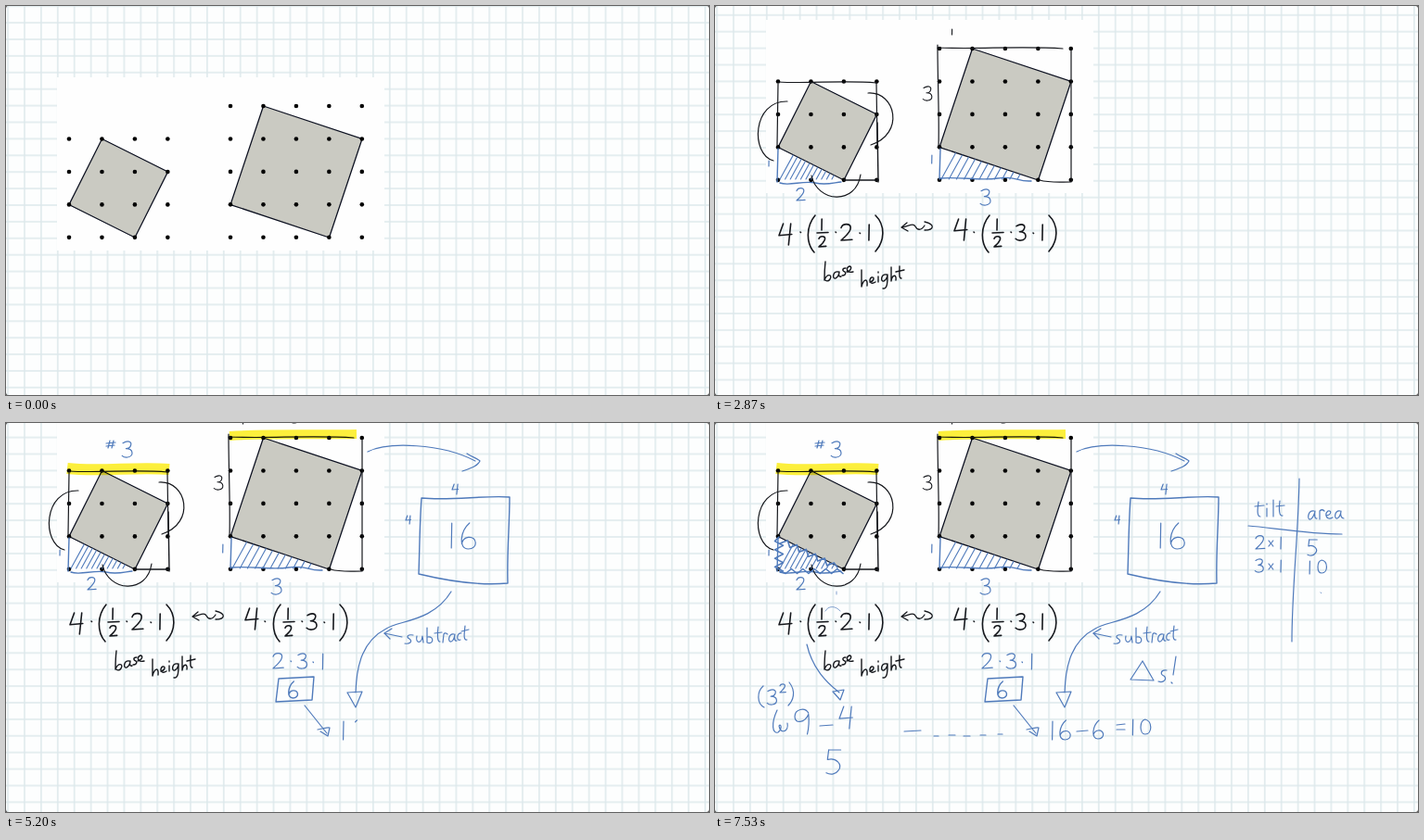
An HTML page that plays this animation: 758x420 px, repeating every 7.59 s.

```html
<!DOCTYPE html>
<html lang="en">
<head>
<meta charset="utf-8">
<title>Tilted squares</title>
<style>
html, body { margin: 0; width: 100%; height: 100%; overflow: hidden; background: #555; }
svg { display: block; width: 758px; height: 420px; border-radius: 3px; background: #fdfefe; }
#ink path { fill: none; stroke-linecap: round; stroke-linejoin: round; }
#ink .marker { stroke-linecap: butt; mix-blend-mode: multiply; }
</style>
</head>
<body>
<svg viewBox="0 0 758 420">
  <defs>
    <pattern id="grid" x="1.2" y="-3.3" width="17.9" height="17.9" patternUnits="userSpaceOnUse">
      <path d="M.9 0V17.9M0 .9H17.9" stroke="#dde9ec" stroke-width="1.5"/>
    </pattern>
  </defs>
  <g id="page">
    <rect y="-100" width="758" height="640" fill="url(#grid)"/>
    <rect x="55" y="-15" width="353" height="187" fill="#fefefe"/>
    <g fill="#cacac2" stroke="#0c1020" stroke-width="1.3">
      <path d="M103.5 51.5L174.5 87L139 158L68 122.5Z"/>
      <path d="M277.5 16L384 51.5L348.5 158L242 122.5Z"/>
    </g>
    <g id="dots"></g>
    <g id="ink"></g>
  </g>
</svg>
<script>
const LOOP = 7590, FRAME = 200 / 3;
const BLACK = '#15171c', BLUE = '#4f7abb', YELLOW = '#fdf03c';
const $ = id => document.getElementById(id);

function add(parent, tag, attrs) {
  const el = document.createElementNS('http://www.w3.org/2000/svg', tag);
  for (const k in attrs) el.setAttribute(k, attrs[k]);
  return parent.appendChild(el);
}

function lattice(x, y, cols, rows) {
  for (let i = 0; i < cols * rows; i++)
    add($('dots'), 'circle', { cx: x + i % cols * 35.45, cy: y + Math.floor(i / cols) * 35.45, r: 2.3 });
}
lattice(68, 51.5, 4, 4);
lattice(242, 16, 5, 5);

// Handwritten digits in a box 10 units high.
const GLYPHS = {
  0: 'M3,0C-1,1 -1,10 3,10C8,10 8,1 3,0',
  1: 'M1,0L.8,10',
  2: 'M0,2C1,-1 6,-1 6,2C6,5 3,7 0,10L7,9.5',
  3: 'M0,1C3,-1 6,0 5,2.5C4.5,4 3,4.5 2,4.5C7,4.5 7,9.5 3,10C1.5,10.2 0,9.5 -.5,9',
  4: 'M2,0L0,5.5L6,5M5.5,0L4.5,10',
  5: 'M1,0L.5,4C4,3 7,6 5,8.5C4,10 2,10.5 0,9.5M1,0L6,0',
  6: 'M3.5,0C0,3 -1,10 3,10C7,10 6.5,5 3,5.5C1.5,5.7 .7,7 .5,8',
  9: 'M5.5,1.5C4,-1 0,0 0,3C0,6 4,5.5 5.5,2C5.8,5 5.5,8 5,10',
  x: 'M0,0L8,10M8,0L0,10',
  '.': 'M0,0L.5,.5'
};
const glyph = (c, x, y, h = 10) => GLYPHS[c].replace(/(-?[\d.]+),(-?[\d.]+)/g,
  (_, a, b) => `${(x + a * h / 10).toFixed(1)},${(y + b * h / 10).toFixed(1)}`);

// Slanted lines filling a right triangle under a falling edge.
function hatch(x0, slope, width, step) {
  let d = '';
  for (let x = x0 + 2; x < x0 + width; x += step) {
    const s = (34 - slope * (x - x0)) / (1 + .55 * slope);
    d += `M${x},157L${x + .55 * s},${157 - s}`;
  }
  return d;
}

function zigzag(x0, y0, x1, y1, n, size) {
  const len = Math.hypot(x1 - x0, y1 - y0);
  let d = `M${x0},${y0}`;
  for (let i = 1; i <= n; i++) {
    const k = i / n, off = (i % 2 ? 1 : -1) * size / len;
    d += `L${x0 + (x1 - x0) * k - (y1 - y0) * off},${y0 + (y1 - y0) * k + (x1 - x0) * off}`;
  }
  return d;
}

// Draws the strokes of d one after another between two times.
const strokes = [];
function ink(from, to, color, width, d, cls = '') {
  const parts = d.match(/M[^M]+/g).map(p => {
    const el = add($('ink'), 'path', { d: p, stroke: color, 'stroke-width': width, class: cls });
    return { el, len: el.getTotalLength() };
  });
  const rate = (to - from) / parts.reduce((sum, p) => sum + p.len + 4, 0);
  for (const p of parts) {
    strokes.push({ ...p, start: from, dur: p.len * rate });
    from += (p.len + 4) * rate;
  }
}
const blue = (from, to, d, w = 1.2) => ink(from, to, BLUE, w, d);
const black = (from, to, d, w = 1.4) => ink(from, to, BLACK, w, d);

// First triangles, with their side lengths
blue(70, 200, 'M68,124L67,160M70,161C80,165 95,158 108,161S130,160 136,160', 1.4);
blue(200, 330, hatch(68, .5, 62, 5.6), 1.1);
blue(330, 420, glyph(1, 57.5, 137, 6) + glyph(2, 88, 167, 13));
blue(430, 530, 'M243,124L242,157M243,156C265,154 285,159 305,156S325,160 341,159', 1.4);
blue(530, 650, hatch(242, 1 / 3, 92, 8.2), 1.1);
blue(650, 720, glyph(1, 233, 131, 9) + glyph(3, 287, 168, 17));

// Box around the small square, and the matching corners
black(730, 860, 'M139,158L176,158M175,96L176,160');
black(880, 1080, 'M174,53L175,120M68,52C100,54 140,50 174,53M68,54L67,120', 1.2);
black(1080, 1330, 'M165,64C195,62 205,108 168,120M78,73C40,72 38,130 63,137M104,153C110,182 152,186 157,152', 1.2);

// One product line; x lists the places of its parts
function product(from, to, n, y, x) {
  black(from, to,
    glyph(4, x[0], y, 23) + glyph('.', x[1], 214) +
    `M${x[2] + 8},196C${x[2] - 2},208 ${x[2] - 2},226 ${x[2] + 7},236` +
    glyph(1, x[3] + 3, 200, 12) + `M${x[3] - 1},215L${x[3] + 11},214.5` + glyph(2, x[3] + 1, 219, 11) +
    glyph('.', x[4], 214) + glyph(n, x[4] + 6, 206, 17) + glyph('.', x[5], 215) + glyph(1, x[5] + 8.5, 206, 17) +
    `M${x[5] + 17},196C${x[5] + 28},207 ${x[5] + 27},224 ${x[5] + 17},235`, 1.6);
}
product(1470, 1690, 2, 205, [69, 92, 100, 111, 130, 156]);
black(1690, 1770, 'M119,246C118,255 118,262 118,266C121,258 127,260 124,265C122,268 119,267 118,265' +
  'M133,257C127,256 126,265 130,264C133,263 134,258 134,257C133,261 134,263 136,262' +
  'M141,253C137,253 137,256 140,257C142,259 140,261 137,261' +
  'M142,257C147,256 148,251 145,251C141,252 141,259 149,257');
black(1770, 1860, 'M158,255L158,273C160,265 165,263 164,272M167,268C172,267 172,262 169,263C165,265 167,272 173,268' +
  'M176,262L176,268M176,257L176,258M185,260C179,259 178,268 182,267C185,266 186,261 186,260C186,268 186,276 181,275' +
  'M190,252L190,267C191,260 196,259 195,266M199,251C199,258 198,264 201,264M195,257L204,255');

black(1930, 2050, 'M207,204L201,209L208,213M202,209C210,207 214,204 216,208S222,213 226,207M226,203C238,206 236,212 226,212', 1.3);
product(2050, 2400, 3, 200, [258, 279, 288, 300, 319, 343]);

// Box around the large square
black(2430, 2740, 'M240,12C240,50 242,90 241,123M384,17L384,159M350,158C360,161 370,160 384,160M240,15C280,17 330,13 375,16', 1.2);
black(2740, 2860, glyph(3, 225, 57, 15) + glyph(1, 255, -5, 6), 1.1);
black(2880, 2960, glyph(3, 308, -12, 12), 1.1);

// Marked sides and the outer square
ink(3200, 3330, YELLOW, 12, 'M66,49C100,53 140,47 176,50', 'marker');
blue(3330, 3450, 'M112,19L110,27M116,19L114,27M108,22L118,21M108,25L117,24' + glyph(3, 126, 20, 17));
ink(3470, 3600, YELLOW, 10, 'M241,14C290,11 330,13 378,12', 'marker');
blue(3600, 3740, 'M390,31C412,20 470,22 506,41M497,33C503,37 508,38 511,41C508,47 501,49 492,52');
blue(3740, 3940, 'M448,81C480,84 515,78 543,80C543,110 540,140 541,173C510,176 470,169 445,163C446,135 446,110 448,81', 1.4);
blue(3940, 4140, glyph(4, 481, 66, 11) + glyph(4, 431, 100, 9) + glyph(1, 478, 108, 27) + glyph(6, 490, 108, 28));

// Working for the large square
blue(4200, 4400, glyph(2, 288, 249, 16) + glyph('.', 307, 257) + glyph(3, 315, 249, 16) + glyph('.', 331, 258) + glyph(1, 340, 249, 17));
blue(4400, 4600, 'M294,276L332,274L330,299L291,301L294,276' + glyph(6, 304, 279, 18), 1.4);
blue(4640, 4900, 'M480,182C460,215 423,213 410,222C385,235 378,260 377,291M368,291L384,290L377,307L368,291');
blue(4900, 5100, 'M427,231L408,227M416,222L408,227L414,233' +
  'M439,229C433,228 431,231 435,233C439,236 435,239 430,238M443,230C441,238 448,239 449,230L450,237' +
  'M454,221L454,237C461,240 462,230 455,231M466,220C465,228 465,237 468,236M462,227L470,226' +
  'M471,237L472,228C473,226 475,227 476,228M483,228C477,227 476,237 480,236C483,235 484,228 484,228C483,233 484,236 486,235' +
  'M491,227C486,226 485,236 490,234M495,219C494,228 493,235 497,234M491,225L499,223');
blue(5100, 5250, 'M322,305L346,335M336,331C342,330 347,328 349,329L347,338L339,333' + glyph(1, 362, 322, 20) + glyph(6, 371, 321, 21));
blue(5250, 5330, 'M390,333L402,332' + glyph(6, 407, 321, 20));
blue(5330, 5470, 'M461,257L448,277L473,278L461,257M487,267C480,266 480,272 484,273C488,276 484,281 478,279M497,252L494,272M492,280L493,281');
blue(5470, 5560, 'M204,333L222,332M236,338L241,338M252,337L259,337M268,338L275,338M286,337L292,337M305,336L310,336', 1.1);

// Working for the small square
blue(5580, 5800, zigzag(69, 123, 69, 160, 8, 4.5) + zigzag(70, 160, 138, 160, 11, 2.5) + zigzag(132, 156, 72, 127, 12, 3), 1.6);
blue(5820, 5960, 'M52,284C45,290 45,303 53,307' + glyph(3, 57, 288, 16) + glyph(2, 70, 282, 9) + 'M80,280C88,290 84,300 79,305');
blue(5960, 6120, 'M67,310C60,325 62,336 68,334C73,330 71,324 69,327C70,336 80,334 78,324' + glyph(9, 86, 309, 27) + 'M113,327L127,326');
blue(6170, 6230, 'M119,203C122,197 130,197 135,203M131,182L131,185', .7);
blue(6240, 6370, 'M99,239C105,265 120,280 134,291M127,290L139,288L135,299L127,290');
blue(6370, 6460, glyph(4, 134, 306, 24));
blue(6470, 6560, glyph(5, 120, 353, 26));
blue(6570, 6690, 'M433,326L442,325M433,331L442,331' + glyph(1, 449, 320, 17) + glyph(0, 459, 320, 16));

// Table
blue(6720, 6870, 'M630,60C629,120 622,180 622,236M575,111C600,113 640,120 676,120');
blue(6870, 7060, 'M586,85C585,93 584,101 588,101M582,90L592,89M595,92L595,101M595,87L595,88M602,83L602,101' +
  'M609,84C608,93 608,101 612,100M605,90L614,89' +
  'M646,95C639,94 638,105 642,104C645,103 647,96 647,95C646,100 647,104 649,103M652,104L652,95C654,93 656,94 657,95' +
  'M659,100C665,99 665,94 661,95C657,98 659,106 666,102M674,95C668,94 667,104 671,103C674,102 675,96 675,95C674,99 675,103 678,103');
const row = (y, n) => glyph(n, 583, y, 14) + glyph('x', 597, y + 5, 6) + glyph(1, 609, y + 1, 13);
blue(7060, 7260, row(122, 2) + glyph(5, 639, 126, 17));
blue(7260, 7460, row(147, 3) + glyph(1, 640, 149, 14) + glyph(0, 650, 148, 14));
blue(7500, 7525, glyph('.', 653, 183), 1);

const ease = (t, from, to) => {
  const k = Math.min(1, Math.max(0, (t - from) / (to - from)));
  return k * k * (3 - 2 * k);
};

function draw(now) {
  const t = Math.floor((now % LOOP + 4) / FRAME) * FRAME;
  const scroll = 92 - 62 * ease(t, 1320, 1460) - 30 * ease(t, 3000, 3140);
  $('page').setAttribute('transform', `translate(0 ${scroll})`);
  for (const s of strokes) {
    const k = Math.min(1, (t - s.start) / s.dur);
    s.el.style.display = k > 0 ? '' : 'none';
    s.el.style.strokeDasharray = k < 1 ? `${Math.max(0, k) * s.len} ${s.len + 9}` : 'none';
  }
}

const begin = performance.now();
(function tick() {
  draw(performance.now() - begin);
  requestAnimationFrame(tick);
})();
</script>
</body>
</html>
```
